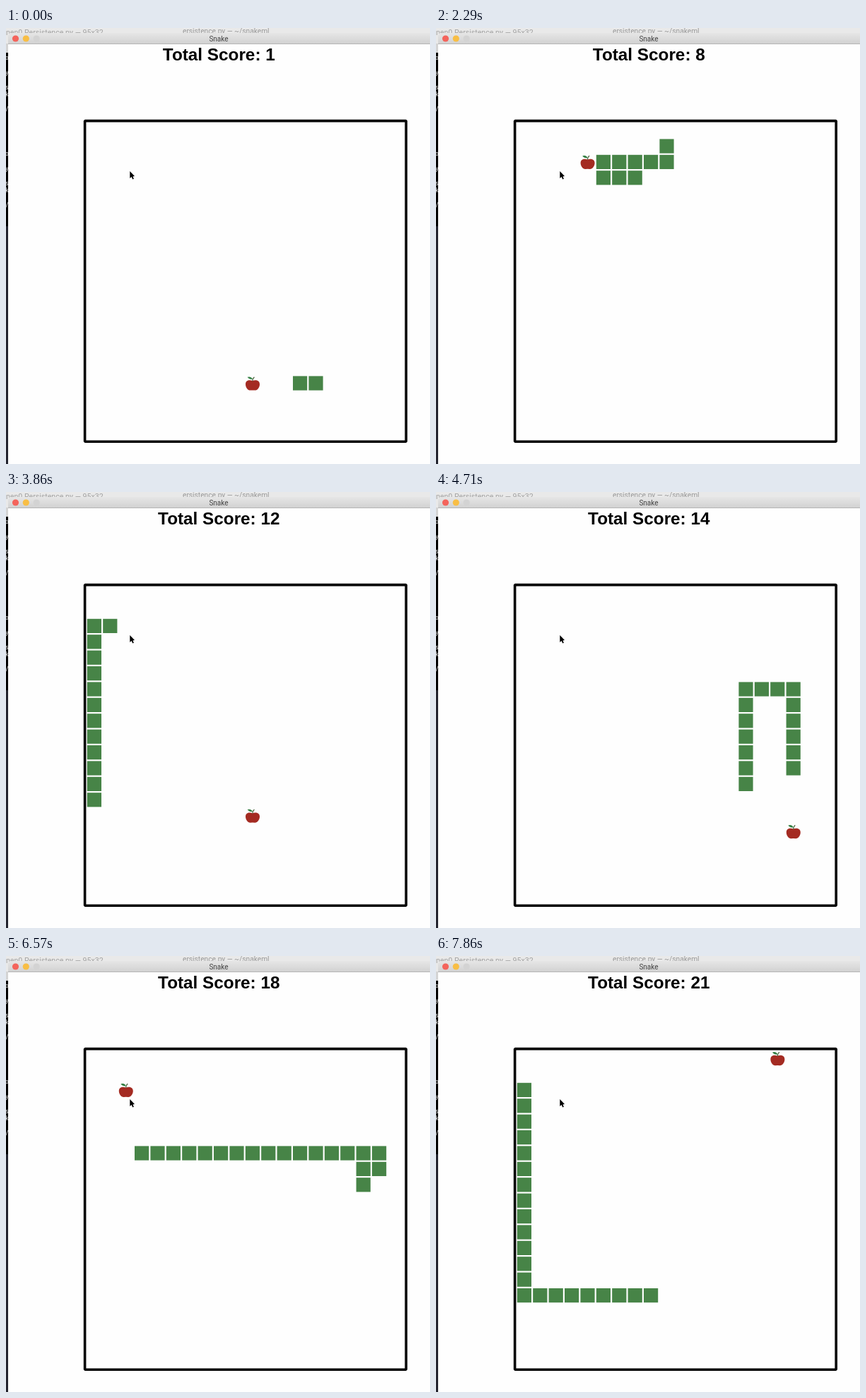
Recreate the animation shown at these times as an HTML page with a canvas. Size 600 by 618 pixels, loop 8000 ms.

```html
<!DOCTYPE html>
<html lang="en">
<head>
<meta charset="utf-8">
<title>Snake</title>
<style>
  html, body { margin: 0; width: 100%; height: 100%; overflow: hidden; background: #fefefe; }
  canvas { display: block; width: 600px; height: 618px; }
</style>
</head>
<body>
<canvas id="stage" width="600" height="618"></canvas>
<script>
const ctx = document.getElementById('stage').getContext('2d');
const LOOP = 8000, FPS = 7;
const PITCH = 22.4, CELL = 20.2, LEFT = 114.8, TOP = 135;

// Cells the snake heads for: plain ones hold an apple, * only bends the way,
// @n is passed at tick n.
const route = `13,16@0 10,16 10,17 3,2 11,2@8
  13,12 13,15 17,18 5,3 9,2* 9,1@16
  4,2 11,18 11,10 0,2 0,13@27
  10,14 14,6 17,15 19,5* 15,13* 14,13* 14,14 13,14@39
  9,11 17,8 17,7* 18,7* 3,6@46
  2,2 17,18 9,15 0,15* 0,2@55 16,0`;

const path = [[14, 16]];   // cell of the head after each step
const scores = [1];        // score after each step
const apples = [];
const keys = [];           // [tick, step]
let heading = [-1, 0];

// Hold the course while the goal lies ahead, otherwise turn towards it.
function walkTo(goal) {
  let cell = path[path.length - 1];
  while (cell[0] !== goal[0] || cell[1] !== goal[1]) {
    const toGoal = goal.map((v, i) => Math.sign(v - cell[i]));
    const axis = heading[0] ? 0 : 1;
    if (toGoal[axis] !== heading[axis]) {
      heading = axis ? [toGoal[0], 0] : [0, toGoal[1]];
    }
    cell = cell.map((v, i) => v + heading[i]);
    path.push(cell);
    scores.push(apples.length + 1);
  }
}

for (const stop of route.trim().split(/\s+/)) {
  const [, x, y, mark, tick] = stop.match(/(\d+),(\d+)([*@]?)(\d*)/);
  const goal = [+x, +y];
  walkTo(goal);
  if (mark === '@') keys.push([+tick, path.length - 1]);
  if (!mark) {
    apples.push(goal);
    scores[path.length - 1] = apples.length + 1;
  }
}

function stepAt(tick) {
  const i = keys.findIndex(([t], n) => n && tick <= t);
  const [t0, s0] = keys[i - 1], [t1, s1] = keys[i];
  return Math.round(s0 + (s1 - s0) * (tick - t0) / (t1 - t0));
}

function rect(x, y, w, h, fill) {
  ctx.fillStyle = fill;
  ctx.fillRect(x, y, w, h);
}

function disc(x, y, r, fill) {
  ctx.fillStyle = fill;
  ctx.beginPath();
  ctx.arc(x, y, r, 0, Math.PI * 2);
  ctx.fill();
}

function label(str, x, y, font, fill, align = 'left') {
  ctx.font = font;
  ctx.fillStyle = fill;
  ctx.textAlign = align;
  ctx.fillText(str, x, y);
}

function drawDesktop() {
  rect(0, 0, 600, 24, '#e9e9e9');
  label('nen0 Persistence.py — 95x32', 0, 10, '10.6px Roboto, sans-serif', '#a2a2a2');
  label('ersistence.py — ~/snakeml', 250, 8, '10.2px Roboto, sans-serif', '#989898');
  rect(0, 22, 4, 13, '#d4d4d4');
  rect(0, 35, 4, 246, '#000');
  rect(0, 281, 4, 337, '#23242f');
  // Line ends of the terminal behind the window.
  for (const top of [45, 181]) {
    [...'o y sk /'].forEach((ch, i) =>
      label(ch, -1, top + i * 10.4, '8px "DejaVu Sans Mono", monospace', '#ddd'));
  }
}

function drawWindow() {
  rect(3, 22, 597, 596, '#fefefe');
  const bar = ctx.createLinearGradient(0, 7, 0, 22);
  bar.addColorStop(0, '#e6e6e6');
  bar.addColorStop(1, '#d2d2d2');
  ctx.fillStyle = bar;
  ctx.beginPath();
  ctx.roundRect(3, 7, 600, 15.5, [4, 0, 0, 0]);
  ctx.fill();
  rect(3, 22, 597, 1, '#b5b5b5');
  ['#f4645c', '#f8be45', '#d3d3d3'].forEach((fill, i) =>
    disc(13.5 + i * 14.8, 15, 4.6, fill));
  label('Snake', 301, 18.8, '10px Roboto, sans-serif', '#444', 'center');
}

function drawBoard() {
  ctx.strokeStyle = '#000';
  ctx.lineWidth = 3.6;
  ctx.lineJoin = 'bevel';
  ctx.strokeRect(111.6, 131.6, 454.6, 454.6);
}

function drawApple([col, row]) {
  ctx.save();
  ctx.translate(LEFT + col * PITCH, TOP + row * PITCH);
  ctx.fillStyle = '#a42b22';
  ctx.beginPath();
  ctx.moveTo(10, 6.6);
  ctx.bezierCurveTo(14, 5, 20.2, 5.6, 20.2, 11.5);
  ctx.bezierCurveTo(20.2, 16, 17, 20.2, 13.5, 20.2);
  ctx.quadraticCurveTo(10, 19.8, 6.8, 20.2);
  ctx.bezierCurveTo(3.4, 20.2, 0.2, 16, 0.2, 11.5);
  ctx.bezierCurveTo(0.2, 5.6, 6, 5, 10, 6.6);
  ctx.fill();
  ctx.strokeStyle = '#49613a';
  ctx.lineWidth = 1.3;
  ctx.beginPath();
  ctx.moveTo(10, 7);
  ctx.quadraticCurveTo(10, 3.5, 12.6, 1.3);
  ctx.stroke();
  ctx.fillStyle = '#348044';
  ctx.beginPath();
  ctx.moveTo(2.8, 1.4);
  ctx.quadraticCurveTo(8.5, 0, 10.2, 4.6);
  ctx.quadraticCurveTo(5.5, 5, 2.8, 1.4);
  ctx.fill();
  ctx.restore();
}

function drawCursor() {
  const arrow = new Path2D('M175.3 203v10l2.3-2 1.6 3.6 1.7-.8-1.5-3.4 2.6-.3z');
  ctx.strokeStyle = '#fff';
  ctx.lineWidth = 1.5;
  ctx.stroke(arrow);
  ctx.fillStyle = '#000';
  ctx.fill(arrow);
}

function draw(ms) {
  const tick = Math.floor((ms % LOOP + 5) * FPS / 1000) % (LOOP * FPS / 1000);
  const step = stepAt(tick);
  const score = scores[step];
  drawDesktop();
  drawWindow();
  label('Total Score: ' + score, 301.3, 45.8,
    'bold 24.3px "Liberation Sans", Arial, sans-serif', '#000', 'center');
  drawBoard();
  drawApple(apples[score - 1]);
  for (const [x, y] of path.slice(Math.max(0, step - score), step + 1)) {
    rect(LEFT + x * PITCH, TOP + y * PITCH, CELL, CELL, '#478447');
  }
  drawCursor();
}

const start = performance.now();
function loop() {
  draw(performance.now() - start);
  requestAnimationFrame(loop);
}
loop();
</script>
</body>
</html>
```
